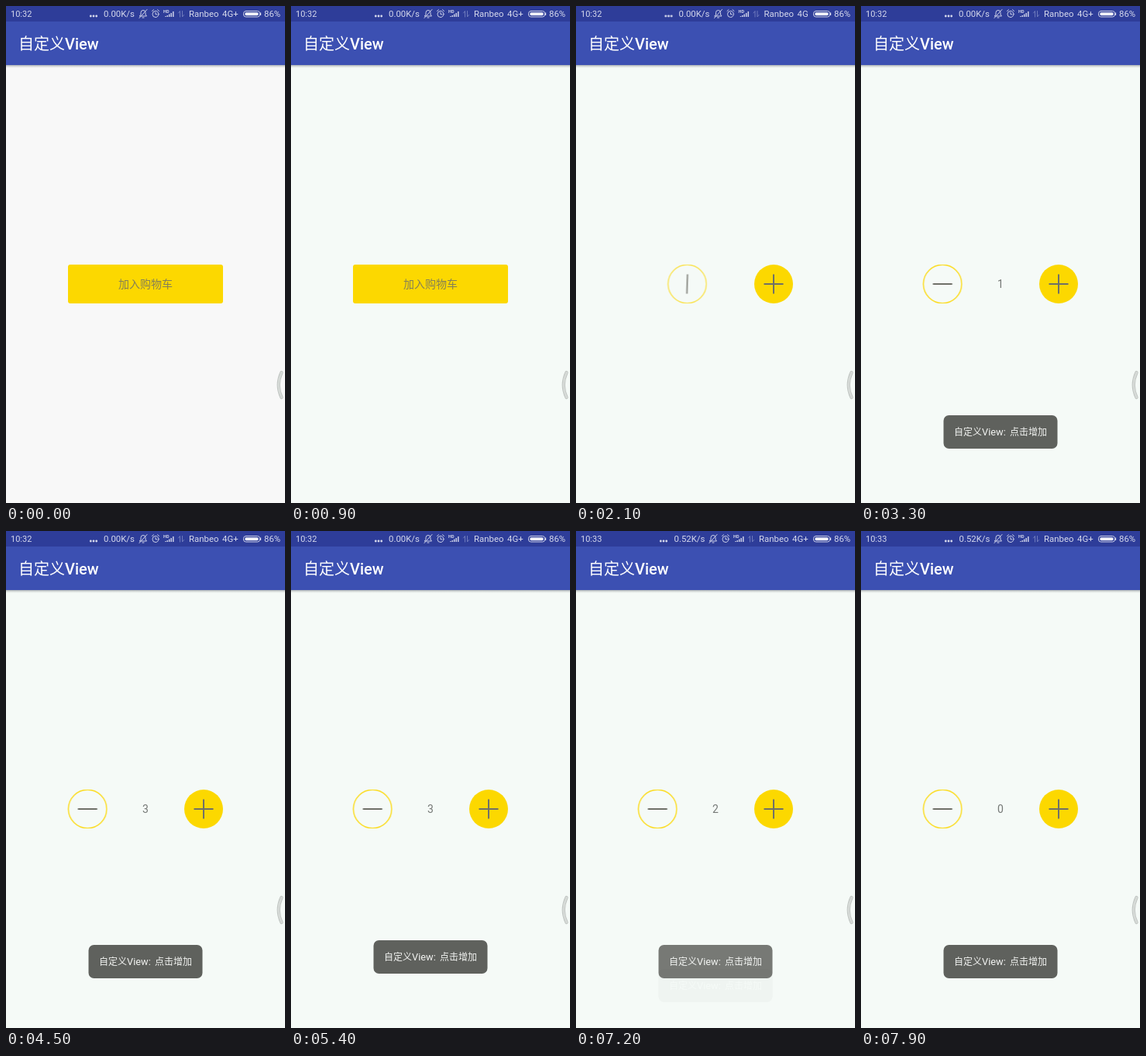
Animation, 360 px wide and 640 px high, one loop 8 s. Source, as an HTML page:

```html
<!DOCTYPE html>
<html lang="zh">
<head>
<meta charset="utf-8">
<title>自定义View</title>
<style>
html, body { margin: 0; width: 100%; height: 100%; overflow: hidden; background: #f5faf7; }
svg { display: block; }
#stage { width: 360px; height: 640px; }
text { font-family: Roboto, "Noto Sans CJK SC", "Noto Sans CJK", sans-serif; white-space: pre; }
.cjk { font-family: "Noto Sans CJK SC", "Noto Sans CJK", sans-serif; font-weight: 300; }
.status { font-size: 11.4px; fill: #d5d8ec; }
.icon { fill: none; stroke: #ccd0e8; stroke-width: 1; stroke-linecap: round; stroke-linejoin: round; }
.sign { stroke: #6f7068; stroke-width: 2; }
.label { font-size: 14px; fill: #858056; }
.digit { font-size: 14px; fill: #757876; text-anchor: middle; }
.notice { font-size: 12px; fill: #f2f3f1; }

/* One shared 8 s timeline: 1% is 80 ms. */
.anim { animation: 8s linear infinite; }
.step { animation: 8s step-end infinite; }
.page { animation-name: page; }
.hint { animation-name: hint; }
.bar { animation-name: bar; }
.plus { animation-name: plus; }
.slide { animation-name: slide; }
.spin { animation-name: spin; }
.count { animation-name: count; }
.early { animation-name: early; }
.late { animation-name: late; }
.network { animation-name: network; }
.boost { animation-name: boost; }
.enter { animation-name: enter; }
.leave { animation-name: leave; }

@keyframes page { 0% { fill: #f8f8f8 } 1.2%, 100% { fill: #f5faf7 } }
@keyframes hint { 0% { opacity: 1 } 13.375%, 100% { opacity: 0 } }
@keyframes bar {
  0% { x: 80px; width: 200px; opacity: 1 }
  13.375% { x: 80px; width: 200px; opacity: 1; animation-timing-function: cubic-bezier(.364, 0, .636, 1) }
  21.125% { x: 230px; width: 50px; opacity: 1; animation-timing-function: step-start }
  100% { x: 230px; width: 50px; opacity: 0 }
}
@keyframes plus { 0% { opacity: 0 } 21.125%, 100% { opacity: 1 } }
@keyframes slide {
  0% { transform: translateX(150px); opacity: 0 }
  21.125% { transform: translateX(150px); opacity: 0; animation-timing-function: cubic-bezier(.364, 0, .636, 1) }
  28.875%, 100% { transform: translateX(0); opacity: 1 }
}
@keyframes spin {
  0% { transform: rotate(360deg) }
  21.125% { transform: rotate(360deg); animation-timing-function: cubic-bezier(.364, 0, .636, 1) }
  28.875%, 100% { transform: rotate(0deg) }
}
@keyframes count {
  0% { opacity: 0; transform: translateY(0) }
  28.875% { opacity: 1; transform: translateY(0) }
  38.6% { opacity: 1; transform: translateY(-20px) }
  45% { opacity: 1; transform: translateY(-40px) }
  54.8% { opacity: 1; transform: translateY(-60px) }
  84.8% { opacity: 1; transform: translateY(-40px) }
  92.4% { opacity: 1; transform: translateY(-20px) }
  98.5%, 100% { opacity: 1; transform: translateY(0) }
}
@keyframes early { 0% { opacity: 1 } 84.8%, 100% { opacity: 0 } }
@keyframes late { 0% { opacity: 0 } 84.8%, 100% { opacity: 1 } }
@keyframes network {
  0% { transform: translateX(0) }
  23.6% { transform: translateX(6.5px) }
  31.1%, 100% { transform: translateX(0) }
}
@keyframes boost { 0% { opacity: 1 } 23.6% { opacity: 0 } 31.1%, 100% { opacity: 1 } }
@keyframes enter {
  0%, 38.5%, 64.75%, 89.75% { opacity: 0; transform: translateY(34px) }
  38.75%, 65%, 90% { opacity: .03; transform: translateY(31px) }
  40%, 66.25%, 91.25% { opacity: .6; transform: translateY(14px) }
  41.25%, 67.5%, 92.5% { opacity: 1; transform: translateY(-6px) }
  42.5%, 68.75%, 93.75% { opacity: 1; transform: translateY(-2px) }
  43.75%, 64.74%, 70%, 89.74%, 95%, 100% { opacity: 1; transform: translateY(0) }
}
@keyframes leave {
  0%, 64.74%, 66.4%, 89.74%, 91.4%, 100% { opacity: 0 }
  64.75%, 89.75% { opacity: 1 }
}
</style>
</head>
<body>
<svg id="stage" viewBox="0 0 360 640">
  <defs>
    <linearGradient id="shade" x2="0" y2="1">
      <stop stop-color="#8f959a" stop-opacity=".75"/>
      <stop offset="1" stop-color="#c8cccb" stop-opacity="0"/>
    </linearGradient>
    <g id="toast">
      <rect x="106.5" y="533" width="147" height="43" rx="7" fill="#5f615d"/>
      <g class="notice">
        <text class="cjk" x="120" y="559">自定义</text>
        <text x="156" y="559" font-size="12.8">View:</text>
        <text class="cjk" x="192" y="559">点击增加</text>
      </g>
    </g>
  </defs>

  <rect class="step page" width="360" height="640" fill="#f5faf7"/>
  <rect y="76" width="360" height="4" fill="url(#shade)"/>
  <rect width="360" height="76" fill="#3c50b2"/>
  <rect width="360" height="20" fill="#2e3d99"/>

  <g class="status">
    <g class="step early"><text x="6" y="14" font-size="11">10:32</text></g>
    <g class="step late"><text x="6" y="14" font-size="11">10:33</text></g>
    <g class="step network">
      <circle cx="109.3" cy="13" r="1.4"/>
      <circle cx="113" cy="13" r="1.4"/>
      <circle cx="116.7" cy="13" r="1.4"/>
      <text class="step early" x="126" y="14">0.00K/s</text>
      <text class="step late" x="126.5" y="14">0.52K/s</text>
      <g class="icon">
        <path d="M172.5 13H181.5L180 11V8.500a3 3 0 0 0-6 0V11ZM176 15h2M182 4.500L172 15.500"/>
        <circle cx="193" cy="10.500" r="4"/>
        <path d="M193 8.500V10.800H195M188.500 6.500L190.500 4.800M197.500 6.500L195.500 4.800"/>
        <path d="M206 14v-1M208.300 14v-2M210.700 14v-3.500M213.200 14v-5M215.800 14v-7" stroke-width="1.500" stroke-linecap="butt"/>
        <path d="M224.500 14V6.500L222.500 9M227.500 6.500V14L229.500 11.500" stroke="#6f7bbd"/>
      </g>
      <text x="203" y="9" font-size="5.500" font-weight="700">HD</text>
      <text x="236" y="14">Ranbeo</text>
      <text x="279" y="14">4G</text>
    </g>
    <text class="step boost" x="293.300" y="14">+</text>
    <rect class="icon" x="306.500" y="6.500" width="21" height="7.500" rx="3"/>
    <rect x="308.300" y="8.200" width="17.400" height="4.100" rx="1.700" fill="#f0f1f8"/>
    <path d="M328.500 8.500v3.500" stroke="#ccd0e8" stroke-width="1.300"/>
    <text x="333" y="14">86%</text>
  </g>

  <g fill="#fff" font-size="20">
    <text class="cjk" x="16" y="56">自定义</text>
    <text x="76" y="56" font-weight="500">View</text>
  </g>

  <rect class="anim bar" x="80" y="333" width="200" height="50" rx="3" fill="#fcd800"/>
  <text class="step hint label cjk" x="145" y="363">加入购物车</text>

  <svg y="333" width="360" height="50" viewBox="0 333 360 50">
    <g transform="translate(105.200 358)">
      <g class="anim slide">
        <circle r="24.700" fill="none" stroke="#fbdc22" stroke-width="1.500"/>
        <path class="anim spin sign" d="M-12.500 0H12.500"/>
      </g>
    </g>
    <g class="step plus">
      <circle cx="255" cy="358" r="25" fill="#fcd800"/>
      <path class="sign" d="M242.500 358H267.500M255 345.500V370.500"/>
    </g>
  </svg>

  <svg x="170" y="348" width="20" height="20">
    <g class="step count digit">
      <text x="10" y="15">0</text>
      <text x="10" y="35">1</text>
      <text x="10" y="55">2</text>
      <text x="10" y="75">3</text>
    </g>
  </svg>

  <g fill="none" stroke-linecap="round">
    <path d="M355.500 472Q348 488 355.500 504" stroke="#bcc1be" stroke-width="4.200"/>
    <path d="M355.500 472Q348 488 355.500 504" stroke="#d6dad7" stroke-width="2.800"/>
  </g>

  <use class="anim leave" href="#toast"/>
  <use class="anim enter" href="#toast"/>
</svg>
</body>
</html>
```
